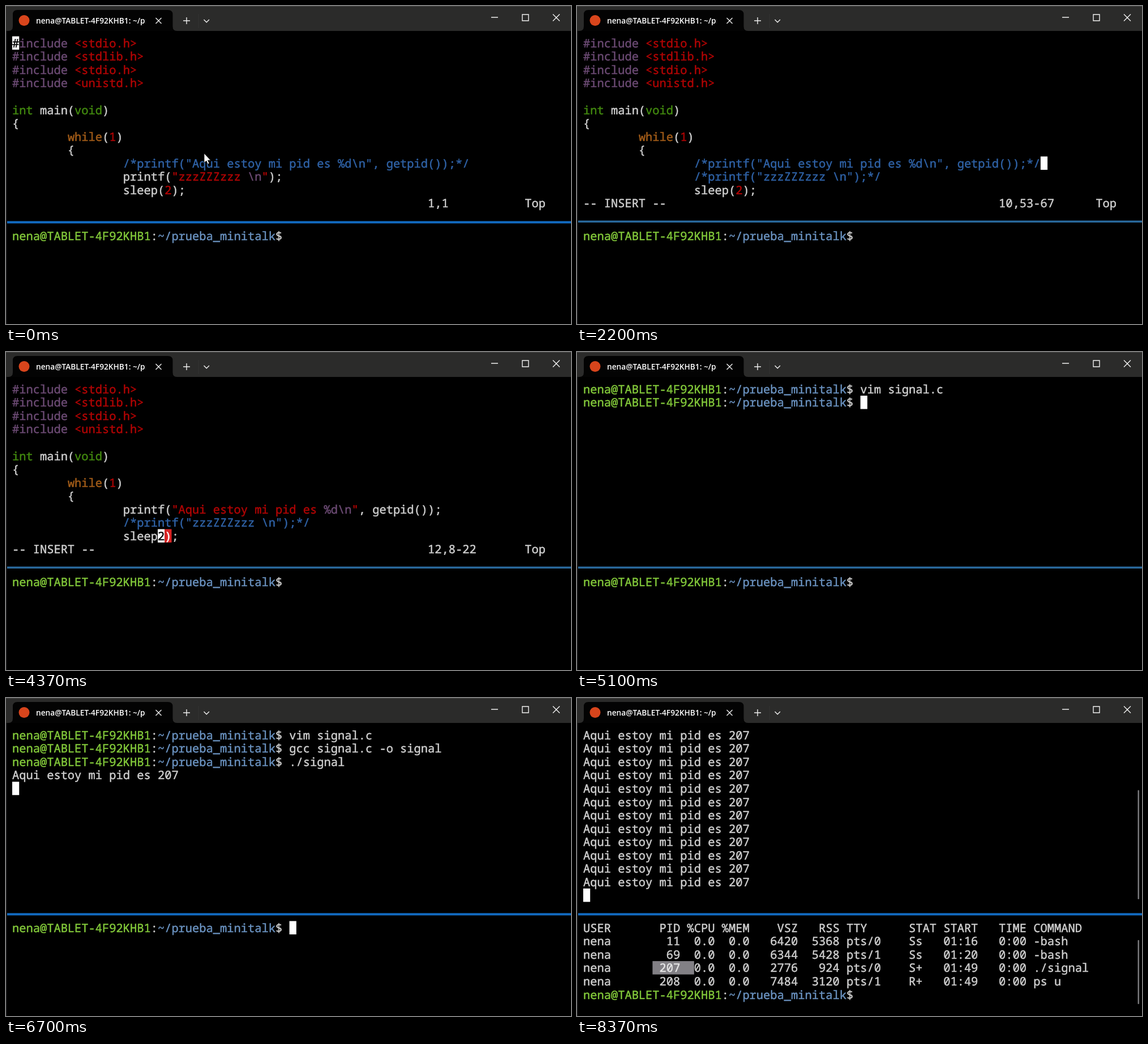
An HTML page that plays this animation: 998 px wide and 561 px high, repeating every 8.41 s.

```html
<!DOCTYPE html>
<html lang="es">
<head>
<meta charset="utf-8">
<title>Terminal</title>
<style>
  html, body { margin: 0; width: 100%; height: 100%; overflow: hidden; background: #000; }
  svg { display: block; }
  .mono text { font: 20.4px "Noto Sans Mono", "DejaVu Sans Mono", monospace; white-space: pre; text-rendering: geometricPrecision; stroke-width: .5; }
  .title { font: 600 13.700px "Open Sans", "Noto Sans", sans-serif; fill: #fff; }
  .icon { fill: none; stroke: #f0f0f0; stroke-width: 1.4; }
</style>
</head>
<body>
<svg width="998" height="561" viewBox="0 0 998 561">
  <defs><clipPath id="tabClip"><rect x="50" y="8" width="197" height="34"/></clipPath></defs>
  <rect width="998" height="561"/>
  <rect width="998" height="44" fill="#2b2b2a"/>
  <rect width="998" height="1" fill="#454543"/>
  <rect y="44" width="1.5" height="517" fill="#1c1c1e"/>
  <path d="M4 44Q12 44 12 36V15Q12 7 20 7H286Q294.500 7 294.500 15V36Q294.500 44 302 44Z" fill="#030303"/>
  <circle cx="32" cy="25.500" r="9.500" fill="#d8451c"/>
  <text class="title" id="tabText" x="53" y="31" clip-path="url(#tabClip)"></text>
  <path class="icon" d="M264.500 21l10 10m0-10l-10 10M313 26h12m-6-6v12M349.500 24l4.700 4.700 4.700-4.700"/>
  <path d="M340 14v25" stroke="#343433"/>
  <path class="icon" d="M857 20h12M912 15h11v11h-11zM966 14.500l12 12m0-12l-12 12"/>
  <rect id="split" x="2" width="996"/>
  <g class="mono" id="top"></g>
  <g class="mono" id="bottom"></g>
  <g fill="#77777a">
    <rect id="topBar" x="990.500" width="2.500" rx="1"/>
    <rect id="bottomBar" x="990.500" y="427" width="2.500" height="113" rx="1"/>
  </g>
  <path id="mouse" d="M0 0V16.500L3.900 13.200L6.500 18.800L9 17.700L6.500 12.200H11.500Z" fill="#fff" stroke="#111" stroke-width=".8"/>
</svg>
<script>
const LOOP = 8410, CELL = 12.24, ROW = 23.55, LEFT = 11, BASE = 19.3, ROWS = 13;
const USER = 'nena', HOST = 'TABLET-4F92KHB1', DIR = '~/prueba_minitalk';
const C = {
  text: '#cfcfcf', pre: '#6b4a73', str: '#b00404', type: '#42890f', key: '#a25c18',
  note: '#2f62a6', user: '#82c83a', path: '#6a92c0', cursor: '#fff', error: '#dc2424', select: '#828085'
};
const $ = id => document.getElementById(id);
const esc = s => s.replace(/&/g, '&amp;').replace(/</g, '&lt;').replace(/>/g, '&gt;');
$('tabText').textContent = `${USER}@${HOST}: ${DIR}`;

// A row is a list of cells: character, colour, background.
const cells = (s, fg = C.text, bg = '') => [...s].map(ch => ({ ch, fg, bg }));
const prompt = (cmd = '') => [
  ...cells(`${USER}@${HOST}`, C.user), ...cells(':'), ...cells(DIR, C.path), ...cells('$ ' + cmd)
];

function paint(row, from, to, bg, fg) {
  while (row.length < to) row.push({ ch: ' ', fg: C.text, bg: '' });
  for (let i = from; i < to; i++) Object.assign(row[i], { bg, fg });
}
const putCursor = (row, col = row.length) => paint(row, col, col + 1, C.cursor, '#000');

function rowsToSvg(rows, top) {
  let boxes = '', texts = '';
  rows.forEach((row, r) => {
    const y = top + r * ROW;
    let spans = '';
    for (let i = 0, j; i < row.length; i = j) {
      const { fg, bg } = row[i];
      let s = '';
      for (j = i; j < row.length && row[j].fg === fg && row[j].bg === bg; j++) s += row[j].ch;
      if (bg) boxes += `<rect x="${LEFT + i * CELL}" y="${y}" width="${(j - i) * CELL}" height="${ROW}" fill="${bg}"/>`;
      spans += `<tspan fill="${fg}" stroke="${fg}">${esc(s)}</tspan>`;
    }
    texts += `<text x="${LEFT}" y="${y + BASE}">${spans}</text>`;
  });
  return boxes + texts;
}

// Editor: replay the keys pressed so far.
const FILE = [
  '#include <stdio.h>', '#include <stdlib.h>', '#include <stdio.h>', '#include <unistd.h>', '',
  'int main(void)', '{', '\twhile(1)', '\t{',
  '\t\t/*printf("Aqui estoy mi pid es %d\\n", getpid());*/',
  '\t\tprintf("zzzZZZzzz \\n");', '\t\tsleep(2);'
];
// start, gap, keys
const KEYS = [
  [350, 50, 'i↓↓↓↓↓↓↓↓↓↓→→'], [1450, 90, '/*'], [1700, 50, '⇥*/'], [2050, 80, '↑⇥⌫⌫'],
  [2800, 60, '⇤↑'], [3350, 90, '↓→→⌦⌦'], [3900, 40, '↓↓→→→→→⌦'], [4450, 60, '('], [4650, 80, '⎋:wq']
];
const QUIT = 5030;

function press(e, k) {
  if (e.mode !== 'insert') {
    if (k === 'i') e.mode = 'insert';
    else e.cmd += k;
    return;
  }
  const s = e.lines[e.r];
  const splice = (from, to, add = '') => { e.lines[e.r] = s.slice(0, from) + add + s.slice(to); };
  switch (k) {
    case '↓': e.r++; break;
    case '↑': e.r--; break;
    case '→': e.c++; break;
    case '⇤': e.c = 0; break;
    case '⇥': e.c = s.length; break;
    case '⌫': splice(e.c - 1, e.c); e.c--; break;
    case '⌦': splice(e.c, e.c + 1); break;
    case '⎋': e.mode = 'normal'; e.c--; break;
    default: splice(e.c, e.c, k); e.c++;
  }
  e.c = Math.min(e.c, e.lines[e.r].length);
}

const WORDS = { '#include': C.pre, int: C.type, void: C.type, while: C.key };

function highlight(lines) {
  let inNote = false;
  return lines.map(line => {
    const out = [], add = (...a) => out.push(...cells(...a));
    let s = line.replace(/\t/g, ' '.repeat(8)), depth = 0;
    while (s) {
      const rule = inNote ? /^(\*\/|\/(?=\*)|[^*\/]+|.)/ : /^(\/\*|"[^"]*"?|<[^>]*>|#include|[a-z]+|\d+|.)/i;
      const w = s.match(rule)[0];
      s = s.slice(w.length);
      if (inNote) {
        if (w === '/') add(w, '#fff', C.error);
        else add(w, C.note);
        if (w === '*/') inNote = false;
      } else if (w === '/*') {
        inNote = true;
        add(w, C.note);
      } else if (w[0] === '"') {
        w.split(/(%d|\\n)/).forEach((p, i) => add(p, i % 2 ? C.pre : C.str));
      } else if (w === ')' && --depth < 0) {
        add(w, '#fff', C.error);
      } else {
        if (w === '(') depth++;
        add(w, /^(<|\d)/.test(w) ? C.str : WORDS[w] || C.text);
      }
    }
    return out;
  });
}

function editorRows(t) {
  const e = { lines: [...FILE], r: 0, c: 0, mode: 'normal', cmd: '' };
  for (const [start, gap, keys] of KEYS)
    [...keys].forEach((k, i) => { if (t >= start + i * gap) press(e, k); });
  const rows = highlight(e.lines);
  const col = e.lines[e.r].slice(0, e.c).replace(/\t/g, ' '.repeat(8)).length;
  const place = `${e.r + 1},${e.c + 1}` + (col === e.c ? '' : `-${col + 1}`);
  const left = e.mode === 'insert' ? '-- INSERT --' : e.cmd;
  const status = cells(left.padEnd(60) + place.padEnd(14) + 'Top');
  rows.push(status);
  if (e.cmd) putCursor(status, e.cmd.length);
  else putCursor(rows[e.r], col);
  return rows;
}

// Shells
const typed = (s, start, gap, t) => s.slice(0, Math.max(0, Math.floor((t - start) / gap)));

function shellRows(t) {
  const rows = [prompt('vim signal.c'), prompt(typed('gcc signal.c -o signal', 5100, 30, t))];
  if (t >= 5980) rows.push(t < 6060 ? [] : prompt(typed('./signal', 6200, 45, t)));
  if (t >= 6620) {
    const n = Math.max(0, Math.floor((t - 6545) / 104));
    for (let i = 0; i < n; i++) rows.push(cells('Aqui estoy mi pid es 207'));
    rows.push([]);
  }
  putCursor(rows[rows.length - 1]);
  return rows;
}

const process = (pid, vsz, rss, tty, stat, start, cmd) =>
  USER.padEnd(8) + pid.padStart(6) + '  0.0  0.0' + vsz.padStart(7) + rss.padStart(6) +
  ' ' + tty.padEnd(9) + stat.padEnd(5) + start + '   0:00 ' + cmd;
const TABLE = [
  'USER       PID %CPU %MEM    VSZ   RSS TTY      STAT START   TIME COMMAND',
  process('11', '6420', '5368', 'pts/0', 'Ss', '01:16', '-bash'),
  process('69', '6344', '5428', 'pts/1', 'Ss', '01:20', '-bash'),
  process('207', '2776', '924', 'pts/0', 'S+', '01:49', './signal'),
  process('208', '7484', '3120', 'pts/1', 'R+', '01:49', 'ps u')
];
const LISTED = 7090, FOCUS = 6700;

function lowerRows(t, mouse) {
  if (t < LISTED) {
    const row = prompt(typed('ps u', 6850, 50, t));
    if (t >= FOCUS) putCursor(row);
    return [row];
  }
  const rows = [...TABLE.map(s => cells(s)), prompt()];
  const drag = (from, max) => {
    const to = Math.min(max, Math.round((mouse.x - LEFT) / CELL));
    if (to > from) paint(rows[3], from, to, C.select, '#e6e6e6');
  };
  if (t >= 7260 && t < 7400) drag(65, 71);
  else if (t >= 7400 && t < 7800) paint(rows[3], 65, 71, C.select, '#e6e6e6');
  else if (t >= 7800) drag(10, 16);
  return rows;
}

// time, x, y
const MOUSE = [
  [0, 350, 260], [350, 350, 260], [7130, 700, 440], [7260, 807, 476], [7390, 875, 480],
  [7480, 875, 480], [7800, 134, 478], [8050, 207, 479], [8410, 207, 479]
];

function mouseAt(t) {
  const i = Math.max(1, MOUSE.findIndex(p => p[0] > t));
  const [t0, x0, y0] = MOUSE[i - 1], [t1, x1, y1] = MOUSE[i];
  const k = (t - t0) / (t1 - t0);
  return { x: x0 + (x1 - x0) * k, y: y0 + (y1 - y0) * k, shown: t < 350 || (t >= 7130 && t < 8250) };
}

const last = {};
function fill(id, svg) {
  if (last[id] !== svg) $(id).innerHTML = last[id] = svg;
}
function set(id, attrs) {
  for (const k in attrs) $(id).setAttribute(k, attrs[k]);
}
const show = (id, on) => set(id, { visibility: on ? 'visible' : 'hidden' });

function draw(t) {
  const mouse = mouseAt(t);
  const rows = t < QUIT ? editorRows(t) : shellRows(t);
  const total = rows.length, thumb = 311 * ROWS / total;
  fill('top', rowsToSvg(rows.slice(-ROWS), 53.5));
  fill('bottom', rowsToSvg(lowerRows(t, mouse), 393.5));
  show('topBar', total > ROWS);
  set('topBar', { y: 355 - thumb, height: thumb });
  show('bottomBar', t >= LISTED);
  const bright = t < 150 || t >= FOCUS;
  set('split', bright ? { y: 379.5, height: 4, fill: '#126bc2' } : { y: 378.5, height: 3.5, fill: '#29699c' });
  show('mouse', mouse.shown);
  set('mouse', { transform: `translate(${mouse.x} ${mouse.y})` });
}

const begin = performance.now();
function tick() {
  draw((performance.now() - begin) % LOOP);
  requestAnimationFrame(tick);
}
tick();
</script>
</body>
</html>
```
